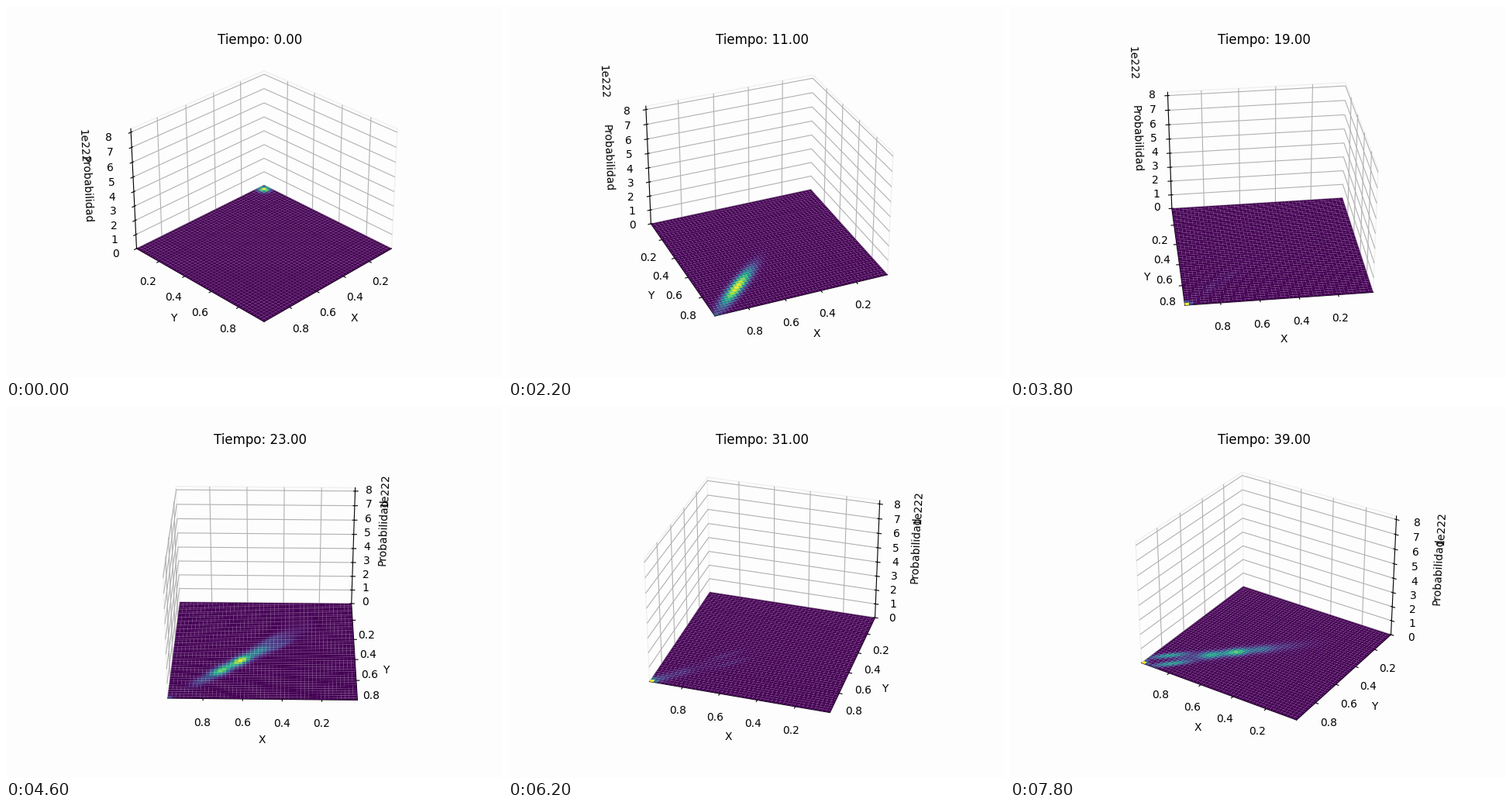
Write a matplotlib script that moves like this. It is 640 px wide and 480 px high and loops after 8000 ms.

```python
import numpy as np
import matplotlib.pyplot as plt
from matplotlib.animation import FuncAnimation

FRAMES, INTERVAL = 40, 200
N = 48
BOUNCE = 14  # step at which the packet first meets the far corner
PAPER = "#fdfdfd"

# Cell centres, measured along and across the diagonal of the floor
mid = (np.arange(N - 1) + 0.5) / (N - 1)
U, V = np.meshgrid(mid, mid)
along, across = (U + V) / 2, U - V


def bell(x, sigma):
    return np.exp(-0.5 * (x / sigma) ** 2)


def packet_centre(t):
    if t <= BOUNCE:
        return 0.035 + 0.069 * t
    return 0.82 - 0.16 * np.cos(2 * np.pi * (t - 23) / 16)


def density(t):
    centre = packet_centre(t)
    length = min(0.0155 + 0.007 * t, 0.1)
    p = bell(along - centre, length) * bell(across, 0.034)

    if t > BOUNCE:
        # Interference stripes, a faint tail and two side lobes
        p *= 1 + 0.25 * np.cos(2 * np.pi * (along - 0.622) / 0.115)
        p += 0.12 * bell(along - centre + 0.2, 0.1) * bell(across, 0.045)
        lobe = 0.15 * 1.12 ** (t - 23)
        lobe_at = 0.44 + 0.028 * (t - 23)
        p += lobe * bell(along - lobe_at, 0.05) * bell(abs(across) - 0.06, 0.02)

    # Build-up in the far corner
    corner = (0.4 * bell(1 - centre, 0.2)
              + 40 * bell(t - 19, 1) + 8 * bell(t - 33, 3.7))
    p += corner * bell(1 - U, 0.018) * bell(1 - V, 0.018)
    return p.ravel()


fig = plt.figure(figsize=(6.4, 4.8), dpi=100, facecolor=PAPER)
ax = fig.add_subplot(111, projection="3d", facecolor=PAPER)

grid = np.linspace(0, 1, N + 2)[1:-1]
X, Y = np.meshgrid(grid, grid)
surface = ax.plot_surface(X, Y, np.zeros_like(X), cmap="viridis")

ax.set_xlim(grid[0], grid[-1])
ax.set_ylim(grid[0], grid[-1])
ax.set_zlim(0, 8.23e222)
ax.set_xlabel("X")
ax.set_ylabel("Y")
ax.set_zlabel("Probabilidad")
for axis in (ax.xaxis, ax.yaxis, ax.zaxis):
    axis.pane.set_facecolor(PAPER)
    axis.pane.set_edgecolor("#f0f0f0")
    axis.pane.set_alpha(1)


def draw(i):
    p = density(i)
    surface.set_array(p)
    surface.set_clim(p.min(), p.max())
    ax.view_init(elev=30, azim=45 + 2 * i)
    ax.set_title(f"Tiempo: {i:.2f}")
    return (surface,)


anim = FuncAnimation(fig, draw, frames=FRAMES, interval=INTERVAL,
                     repeat=True, repeat_delay=0, blit=False)
plt.show()
```
